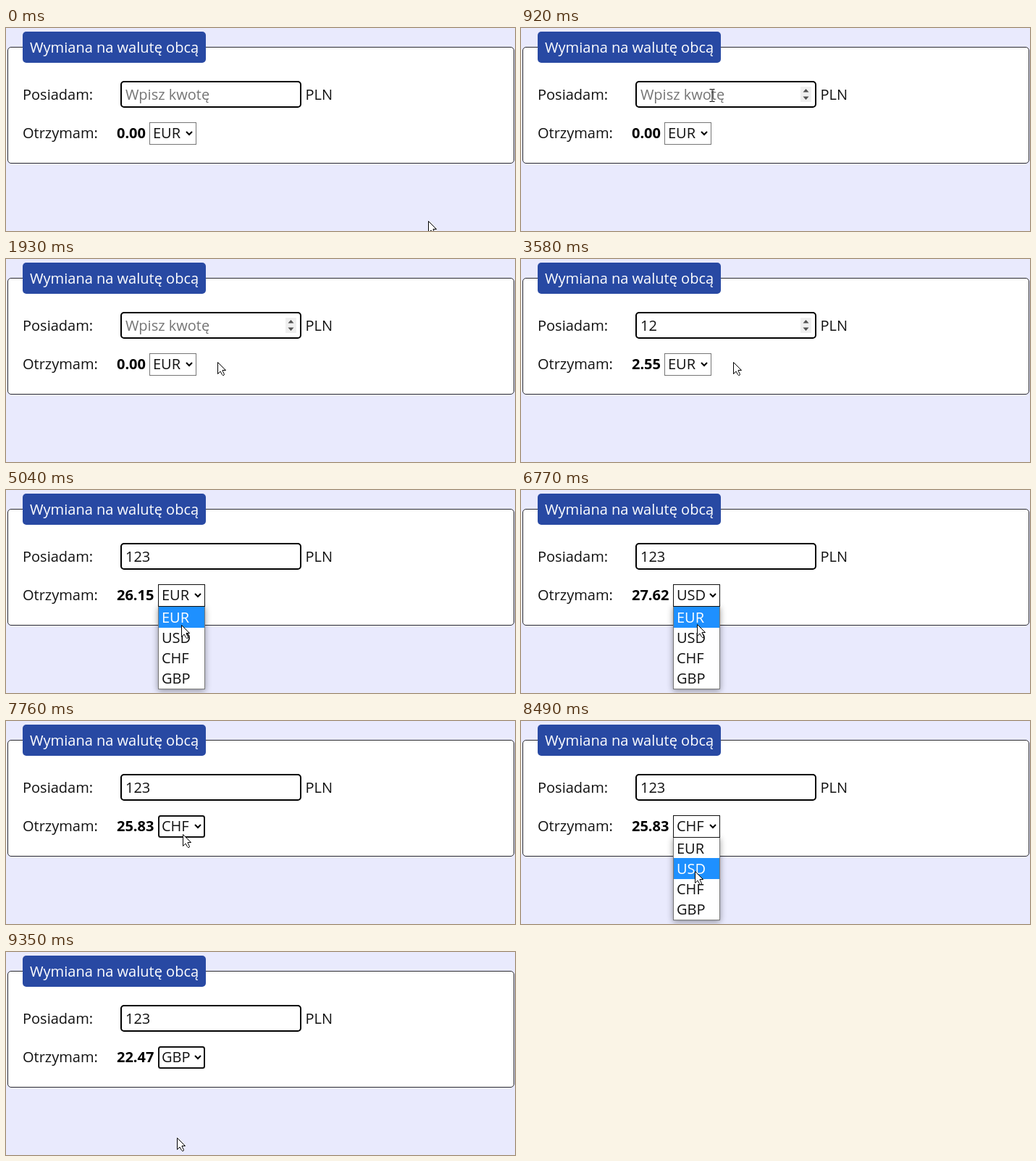
Recreate the animation shown at these times as an HTML page. Size 703 px wide and 280 px high, loop 9940 ms.

```html
<!DOCTYPE html>
<html lang="pl">
<head>
<meta charset="utf-8">
<title>Wymiana na walutę obcą</title>
<style>
  html, body { margin: 0; width: 100%; height: 100%; overflow: hidden; background: #e9eafd; }
  svg { display: block; width: 703px; height: 280px; }
  text { font: 20px "Open Sans", sans-serif; fill: #111; white-space: pre; }
  .bold { font-weight: 700; fill: #000; }
  .hint { fill: #757575; }
  .light { fill: #fff; }
  #list { filter: drop-shadow(0 2px 4px rgba(0, 0, 0, .4)); }
  .chevron { fill: none; stroke: #000; stroke-width: 2; }
  #pointer path { stroke: #000; stroke-linejoin: round; }
</style>
</head>
<body>
<svg viewBox="0 0 703 280">
  <rect width="703" height="280" fill="#e9eafd"/>
  <rect x="2.5" y="26.5" width="699" height="160" rx="4.5" fill="#fff" stroke="#2b2b30"/>
  <rect x="23" y="5" width="253" height="43" rx="5" fill="#2849a3"/>
  <text class="light" x="33" y="34">Wymiana na walutę obcą</text>

  <text x="23" y="99">Posiadam:</text>
  <rect x="159" y="74" width="248" height="35" rx="4" fill="#fff" stroke="#000" stroke-width="2"/>
  <text id="hint" class="hint" x="165" y="99">Wpisz kwotę</text>
  <text id="amount" x="165" y="99"></text>
  <rect id="caret" y="80" width="1" height="23"/>
  <g id="spinner">
    <rect x="386" y="81" width="15" height="21" fill="#efefef"/>
    <path d="M389.5 88.5l4-4.5 4 4.5zM389.5 94.5l4 4.5 4-4.5z" fill="#505050"/>
  </g>
  <text x="413.5" y="99">PLN</text>

  <text x="23" y="152">Otrzymam:</text>
  <text id="result" class="bold" x="153" y="152"></text>

  <g id="list">
    <rect x="210.5" y="160.5" width="64" height="114" fill="#fff" stroke="#767676"/>
    <rect id="mark" x="211" width="63" height="29" fill="#1e90ff"/>
  </g>
  <g id="select">
    <rect id="frame" fill="#fff"/>
    <text id="code" x="5" y="152"></text>
    <path class="chevron" d="M51 143l4 4 4-4"/>
  </g>

  <g id="pointer">
    <path id="arrow" d="M.5 .5V16.5L4 13 6.5 17.5 7.5 18.5 9 18.2 9.4 16.8 7 12V11.5H11.5Z" fill="#fff"/>
    <path id="beam" d="M-3.5 -8.5h3l.5 .5 .5 -.5h3M0 -8V8M-3.5 8.5h3l.5 -.5 .5 .5h3" fill="none"/>
  </g>
</svg>
<script>
const LOOP = 9940, TICK = LOOP / 150;
const CLICK = 930, BLINK = 530;               // field gets the caret
const OPEN = 4640, ROUND = 1790, STAY = 990;  // the list opens once per round
const ROW = 28, LIST_TOP = 161;

const codes = ['EUR', 'USD', 'CHF', 'GBP'];
const rates = [4.7038, 4.4533, 4.762, 5.474];
const keyTimes = [2120, 2980, 3910];

// Pointer moves: from tick, to tick, x, y
const home = [583, 266];
const moves = [
  [0, 5, 238, 93], [9, 15, 270, 93], [17, 19, 285, 108], [21, 25, 290, 150],
  [28, 29, 292, 142], [53, 54, 293, 142], [63, 67, 240, 149], [73, 78, 243, 199],
  [86, 91, 238, 155], [91, 94, 240, 146], [99, 107, 245, 224], [114, 117, 244, 156],
  [125, 133, 236, 256]
];

const $ = id => document.getElementById(id);
const show = (el, on) => el.style.display = on ? '' : 'none';
const easeOut = k => 1 - (1 - k) ** 1.5;

function setAttrs(el, attrs) {
  for (const name in attrs) el.setAttribute(name, attrs[name]);
}

function pointerAt(tick) {
  let [x, y] = home;
  for (const [from, to, toX, toY] of moves) {
    if (tick <= from) break;
    const k = easeOut(Math.min(1, (tick - from) / (to - from)));
    x += (toX - x) * k;
    y += (toY - y) * k;
  }
  return [Math.round(x), Math.round(y)];
}

const options = codes.map((code, i) => {
  const el = document.createElementNS('http://www.w3.org/2000/svg', 'text');
  el.textContent = code;
  setAttrs(el, { x: 215, y: LIST_TOP + 22 + ROW * i });
  $('list').append(el);
  return el;
});

function drawField(t) {
  const keys = keyTimes.filter(k => k <= t);
  const amount = '123'.slice(0, keys.length);
  const sinceInput = t - (keys.pop() || CLICK);
  $('amount').textContent = amount;
  show($('hint'), !amount);
  show($('caret'), t < OPEN && sinceInput >= 0 && sinceInput % (2 * BLINK) < BLINK);
  $('caret').setAttribute('x', 165 + Math.floor(amount.length * 11.44));
  return amount;
}

function drawSelect(x, code, active, open) {
  const w = active && !open ? 2 : 1;
  $('select').setAttribute('transform', `translate(${x})`);
  $('code').textContent = code;
  setAttrs($('frame'), {
    x: w / 2, y: 130 + w / 2, width: 65 - w, height: 31 - w,
    rx: w > 1 ? 2.5 : 0, stroke: active ? '#101010' : '#767676', 'stroke-width': w
  });
}

function drawList(y, choice, open) {
  const hover = y < LIST_TOP ? choice : Math.min(3, Math.floor((y - LIST_TOP) / ROW));
  show($('list'), open);
  $('mark').setAttribute('y', LIST_TOP + ROW * hover);
  options.forEach((el, i) => el.classList.toggle('light', i === hover));
}

function drawPointer(x, y) {
  const inField = x > 158 && x < 408 && y > 73 && y < 110;
  show($('beam'), inField);
  show($('arrow'), !inField);
  $('pointer').setAttribute('transform', `translate(${x} ${y})`);
}

function draw(t) {
  const [x, y] = pointerAt(Math.floor((t + 5) / TICK));
  const active = t >= OPEN;
  const round = Math.floor((t - OPEN) / ROUND);
  const open = active && t - OPEN - round * ROUND < STAY;
  const choice = active ? round + !open : 0;

  const amount = drawField(t);
  const result = (amount / rates[choice]).toFixed(2);
  $('result').textContent = result;
  show($('spinner'), t >= 5 * TICK - 5 && !active);
  drawSelect(result.length > 4 ? 210 : 198, codes[choice], active, open);
  drawList(y, choice, open);
  drawPointer(x, y);
}

const start = performance.now();
function frame() {
  draw((performance.now() - start) % LOOP);
  requestAnimationFrame(frame);
}
frame();
</script>
</body>
</html>
```
